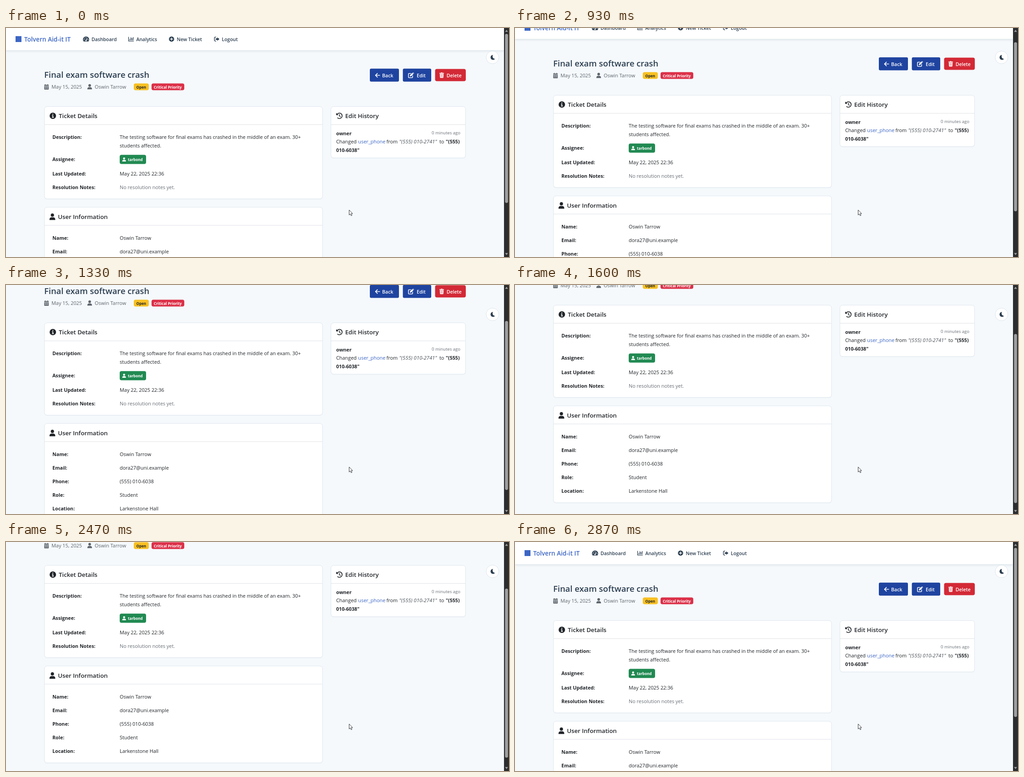
An HTML page for the animation above (3.67 s loop, 1106 by 506 pixels).

```html
<!DOCTYPE html>
<html lang="en">
<head>
<meta charset="utf-8">
<title>Ticket page</title>
<style>
html, body { margin: 0; width: 100%; height: 100%; overflow: hidden; background: #f5f9fc; }
svg { display: block; width: 1106px; height: 506px; }
text { font-family: "Open Sans", "Noto Sans", sans-serif; font-size: 10.9px; fill: #212529; white-space: pre; }
.nav { font-weight: 600; font-size: 10.5px; fill: #2c3e50; }
.brand { font-weight: 600; font-size: 13.6px; fill: #3c66c4; }
.title { font-weight: 600; font-size: 18.4px; fill: #2c3e50; }
.head { font-weight: 600; font-size: 13.2px; }
.bold { font-weight: 700; font-size: 10.7px; }
.meta { fill: #5c646b; }
.mute { fill: #666d74; }
.small { fill: #666d74; font-size: 9.55px; text-anchor: end; }
.link { fill: #3c66c4; }
.ital { font-style: italic; font-size: 11.2px; fill: #495057; }
.btn { font-weight: 600; font-size: 10.6px; fill: #fff; }
.tag { font-weight: 700; font-size: 8.1px; fill: #fff; }
.tag.dark { fill: #212529; }
.line { fill: none; stroke-linecap: round; stroke-linejoin: round; }
</style>
</head>
<body>
<svg id="stage" viewBox="0 0 1106 506" xmlns="http://www.w3.org/2000/svg"></svg>
<script>
const LOOP = 3670, MAX = 144.5, INK = '#212529', NAVY = '#2c3e50', GREY = '#5c646b';

const text = (x, y, s, cls = '') => `<text x="${x}" y="${y}" class="${cls}">${s}</text>`;
const rect = (x, y, w, h, fill, r = 0, more = '') =>
  `<rect x="${x}" y="${y}" width="${w}" height="${h}" rx="${r}" fill="${fill}" ${more}/>`;
const disc = (x, y, r, fill) => `<circle cx="${x}" cy="${y}" r="${r}" fill="${fill}"/>`;
const shape = (d, fill) => `<path d="${d}" fill="${fill}"/>`;
const line = (d, color, w) => `<path class="line" d="${d}" stroke="${color}" stroke-width="${w}"/>`;
const at = (x, y, body, k = 1) => `<g transform="translate(${x} ${y}) scale(${k})">${body}</g>`;

// Icons are drawn around their own centre
const person = color => disc(0, -3.4, 3.4, color) +
  shape('M-6 6.8V5.4C-6 2.6-4 1.1-1.6 1.1H1.6C4 1.1 6 2.6 6 5.4V6.8Z', color);
const gauge = shape('M-5.4 5.2A6.8 6.8 0 1 1 5.4 5.2Z', NAVY) +
  [[-4.3, 1.2], [-3.1, -1.9], [0, -3.2], [4.3, 1.2]].map(([x, y]) => disc(x, y, .85, '#fff')).join('') +
  line('M0 2.6L2.8-2', '#fff', 1.1) + disc(0, 2.8, 1.5, '#fff');
const bars = line('M-5.4-4.4V4.4H5.4', NAVY, 1.3) +
  line('M-2.6 1.8V.2M-.2 1.8V-3.4M2.2 1.8V-1.4M4.6 1.8V-3.8', NAVY, 1.4);
const plus = disc(0, 0, 5.7, NAVY) + line('M-2.8 0H2.8M0-2.8V2.8', '#fff', 1.5);
const exit = line('M-1.8-4.2H-3.6Q-5-4.2-5-2.8V2.8Q-5 4.2-3.6 4.2H-1.8', NAVY, 1.4) +
  shape('M-2.4-1.5H1.2V-4L5.8 0L1.2 4V1.5H-2.4Z', NAVY);
const calendar = shape('M-5-4.4H5V5Q5 6 4 6H-4Q-5 6-5 5Z', GREY) +
  line('M-2.6-5.4V-4M2.6-5.4V-4', GREY, 1.4) + rect(-5, -2.5, 10, .9, '#f5f9fc') +
  line('M-3.2.4H3.2M-3.2 3.2H3.2', '#f5f9fc', 1.2) + line('M-1.2-1V5M1.2-1V5', GREY, .9);
const info = disc(0, 0, 7.1, INK) + disc(0, -3.4, 1.1, '#fff') +
  line('M-1.2-.6H.2V3.5M-1.5 3.5H1.7', '#fff', 1.5);
const clock = line('M-4.8-3.5A6 6 0 1 1-3.8 4.6', INK, 1.7) +
  shape('M-7-6.6V-1.6H-2Z', INK) + line('M.2-3V.4L2.4 2', INK, 1.5);
const back = line('M4.6 0H-4.2M-.4-4.2L-4.6 0L-.4 4.2', '#fff', 1.7);
const pencil = line('M-.4-4H-4.4Q-5.6-4-5.6-2.8V4Q-5.6 5.2-4.4 5.2H2.4Q3.6 5.2 3.6 4V1', '#fff', 1.5) +
  shape('M-2.6 2.4L-2-.6L3-5.4L5.4-3L.4 1.9Z', '#fff') + shape('M3.7-6L4.5-6.6L6.8-4.4L6-3.6Z', '#fff');
const trash = shape('M-5-5H-1.9L-1.3-6H1.3L1.9-5H5V-3.6H-5Z', '#fff') +
  shape('M-4.2-2.8H4.2L3.7 5Q3.6 6 2.6 6H-2.6Q-3.6 6-3.7 5Z', '#fff') +
  line('M-1.9-1V4M0-1V4M1.9-1V4', '#d32936', .6);

const card = (x, y, w, h) =>
  rect(x, y + 1, w, h, '#30506e', 6, 'opacity=".035"') +
  rect(x + .5, y + .5, w - 1, h - 1, '#fff', 6, 'stroke="#dfe7ee"') +
  rect(x + 1, y + 40, w - 2, 1, '#dde2e7');
const row = (y, label, value, cls) => text(102, y, label, 'bold') + (value ? text(250, y, value, cls) : '');

const navbar =
  rect(0, 0, 1095, 49, '#fff', 0, 'filter="url(#soft)"') +
  rect(21, 18, 13, 13, '#3c66c4') + text(40, 30, 'Tolvern Aid-it IT', 'brand') +
  [[176, gauge, 188, 'Dashboard'], [275, bars, 286.5, 'Analytics'],
   [364, plus, 375.5, 'New Ticket'], [463.3, exit, 474.5, 'Logout']]
    .map(([ix, icon, x, s]) => at(ix, 24.5, icon) + text(x, 29, s, 'nav')).join('');

const header =
  text(84, 110, 'Final exam software crash', 'title') +
  at(89, 130, calendar) + text(100, 134, 'May 15, 2025', 'meta') +
  at(184, 129.8, person(GREY), .84) + text(195, 134, 'Oswin Tarrow', 'meta') +
  rect(281, 122.6, 33, 14.8, '#f8c022', 4) + text(286.5, 133.5, 'Open', 'tag dark') +
  rect(320, 122.6, 72, 14.8, '#dc3048', 4) + text(325, 133.5, 'Critical Priority', 'tag') +
  rect(800, 89.8, 64, 28.8, '#1f44a0', 3) + at(817, 104.5, back) + text(827, 108.5, 'Back', 'btn') +
  rect(872.6, 89.8, 62.4, 28.8, '#1f44a0', 3) + at(890.5, 104.5, pencil) + text(903, 108.5, 'Edit', 'btn') +
  rect(943.5, 90.5, 67.5, 27, '#d32936', 4) + at(958, 104.3, trash) + text(968.7, 108.5, 'Delete', 'btn');

const details =
  card(84, 173, 612.5, 205) + at(103, 194, info) + text(116, 199, 'Ticket Details', 'head') +
  row(245, 'Description:', 'The testing software for final exams has crashed in the middle of an exam. 30+') +
  text(250, 263.5, 'students affected.') +
  row(294, 'Assignee:') + rect(250, 280.2, 58, 20.2, '#218a52', 4) +
  at(259.7, 290.5, person('#fff'), .66) + text(268, 293.5, 'tarbond', 'tag') +
  row(326, 'Last Updated:', 'May 22, 2025 22:36') +
  row(356, 'Resolution Notes:', 'No resolution notes yet.', 'mute');

const user =
  card(84, 395.5, 612.5, 215) + at(102, 417, person(INK), 1.05) + text(114.3, 422, 'User Information', 'head') +
  [['Name:', 'Oswin Tarrow'], ['Email:', 'dora27@uni.example'], ['Phone:', '(555) 010-6038'],
   ['Role:', 'Student'], ['Location:', 'Larkenstone Hall']]
    .map(([k, v], i) => row(468 + 30 * i, k, v)).join('');

const log =
  card(714, 173, 297, 114.5) + at(733, 194, clock) + text(745.7, 199, 'Edit History', 'head') +
  text(726, 236.5, 'owner', 'bold') + text(999, 235, '0 minutes ago', 'small') +
  text(726, 255, 'Changed') + text(774.3, 255, 'user_phone', 'link') + text(836.5, 255, 'from') +
  text(864.5, 255, '"(555) 010-2741"', 'ital') + text(953, 255, 'to') +
  text(967, 255, '"(555)', 'bold') + text(726, 273.5, '010-6038"', 'bold');

const toggle = `<circle cx="1069.8" cy="65" r="14" fill="#fff" stroke="#dde5ec"/>` +
  shape('M1070.8 59.6A5.4 5.4 0 1 0 1075.2 68.2A5.6 5.6 0 0 1 1070.8 59.6Z', NAVY);
const scrollbar = rect(1095, 0, 11, 506, '#2b2d2e') +
  shape('M1097.3 8.5L1100.6 4L1103.9 8.5Z', '#9fa0a1') +
  shape('M1097.3 497.2L1100.6 501.7L1103.9 497.2Z', '#9fa0a1') +
  '<rect id="thumb" x="1097.3" y="13" width="6.6" height="373.5" rx="3.3" fill="#9fa0a1"/>';
const pointer = '<path d="M754.5 402V413.2L757.1 410.9L758.9 414.9L760.8 414L759 410.2H762.2Z"' +
  ' fill="#fff" stroke="#22262a" stroke-width=".9" stroke-linejoin="round"/>';

document.getElementById('stage').innerHTML =
  `<defs><filter id="soft" x="-5%" y="-30%" width="110%" height="180%">
    <feDropShadow dx="0" dy="1.5" stdDeviation="2.5" flood-color="#203040" flood-opacity=".12"/>
  </filter></defs>` +
  rect(0, 0, 1106, 506, '#f5f9fc') +
  `<g id="page">${navbar}${header}${details}${user}${log}</g>` +
  toggle + scrollbar + pointer;

const page = document.getElementById('page'), thumb = document.getElementById('thumb');
const ease = u => (1 - Math.cos(Math.PI * u)) / 2;

// The picture advances 15 times a second, on 10 ms marks
function tick(ms) {
  const n = Math.floor((Math.floor(ms / 10) * 10 + 5) * 3 / 200);
  return Math.round(n * 20 / 3) * 10;
}

function scrollAt(t) {
  if (t < 600 || t >= 2870) return 0;
  if (t < 1800) return MAX * ease((t - 580) / 1295);
  if (t < 2200) return MAX;
  return MAX * (1 - ease(((t - 2070) / 800) ** 1.94));
}

function draw(ms) {
  const y = Math.round(scrollAt(tick(ms)));
  page.setAttribute('transform', `translate(0 ${-y})`);
  thumb.setAttribute('y', 13 + y * .738);
}

const start = performance.now();
function loop() {
  draw((performance.now() - start) % LOOP);
  requestAnimationFrame(loop);
}
loop();
</script>
</body>
</html>
```
